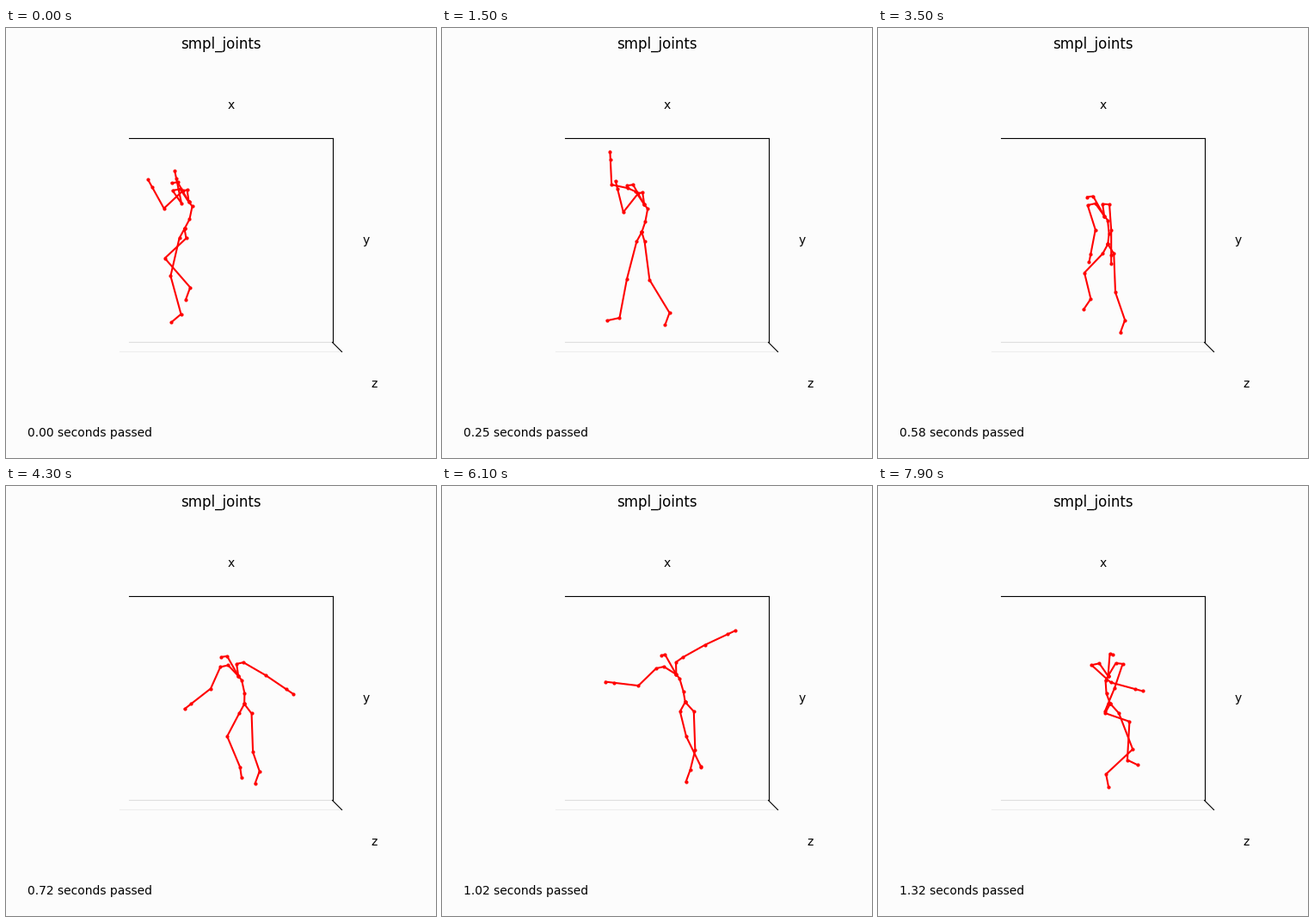
A matplotlib script for the animation above (8000 ms loop, 500 by 500 pixels).

```python
import numpy as np
import matplotlib.pyplot as plt
from matplotlib.animation import FuncAnimation

SIZE, DPI = 500, 100
FRAMES, STEP, FPS = 80, 100, 60
RED = "#ff0000"

t = np.arange(FRAMES) * STEP / 1000


def ease(start, end):
    """Smooth step from 0 to 1 between two times."""
    u = np.clip((t - start) / (end - start), 0, 1)
    return u * u * (3 - 2 * u)


def bump(center, width):
    """Passing swell that peaks at 1."""
    return np.exp(-((t - center) / width) ** 2)


def bone(parent, length, degrees):
    """End of a bone; 0 degrees points right, 90 points down."""
    return parent + length * np.exp(1j * np.radians(degrees))


def limb(root, *bones):
    """Joints of a chain whose bones are (length, degrees)."""
    joints = list(root)
    for length, degrees in bones:
        joints.append(bone(joints[-1], length, degrees))
    return np.array(joints)


# Torso: points are complex numbers, x + iy in pixels.
late = ease(6.9, 7.9)
pelvis = (195.3 + 88 * ease(-1.7, 5.4) - 13 * ease(6.8, 8)
          + 1j * (234 + 5 * ease(0, 2.2) + 15 * ease(2.2, 3.9) - 4 * bump(6.7, 0.8)))
waist = bone(pelvis, 12.5, -62 - 6.2 * t)
back = bone(waist, 15.5, -92 + 15 * np.cos(2 * np.pi * (t - 0.6) / 10))
chest = back - 4 - 5j + 7 * late
neck = chest - 13 - 23j + (15 - 3j) * late
head = neck - 7 + 1j + 10 * ease(5.2, 7.6)
spine = np.array([pelvis, waist, back, chest, neck, head])

# Legs
left_hip = pelvis + 2 + 11j + 8 * ease(0, 6)
left_leg = limb(
    [pelvis, left_hip],
    (45 - 11 * bump(0, 0.5),
     88 + 49 * bump(0, 0.55) - 8 * bump(2, 0.8) - 19 * ease(6.2, 7.9)),
    (45 - 28 * bump(5.2, 1.75), 49 + 22 * ease(0.9, 2.2) + 66 * ease(5.2, 7)),
    (15, 110 - 31 * late),
)
right_leg = limb(
    [pelvis, pelvis - 6 + 11j],
    (45 - 15 * ease(2.2, 3.7),
     103 + 31 * bump(3.4, 1.1) - 29 * ease(4, 6.5) - 56 * ease(6.8, 8)),
    (46 - 15 * bump(3.6, 0.8) - 9 * bump(6.5, 1),
     64 + 38 * bump(1.8, 1.6) + 30 * ease(7, 8)),
    (15 - 14 * bump(6, 1.3),
     140 + 28 * ease(0, 1.6) - 110 * ease(2.2, 5.2) - 33 * ease(7, 8)),
)

# Arms: the hand continues the forearm.
HAND = 9.5
left_collar = chest - 2 - 14j + (11 - 1j) * ease(5.5, 7.9)
left_shoulder = left_collar - 5 + 1j + 13 * ease(2.2, 3.5) - 9j * bump(5.5, 1.1)
swing = -134 * ease(3.5, 5.3) + 170 * ease(5.5, 8.4)
left_fore = 241 + 15 * ease(0, 0.9) - 166 * ease(2.2, 3.4) + swing
left_arm = limb(
    [chest, left_collar, left_shoulder],
    (30 - 8 * bump(2.2, 0.6), 137 - 51 * ease(0.9, 3.2) + swing),
    (29 - 5 * bump(0.9, 0.5) - 10 * ease(7, 8), left_fore),
    (HAND, left_fore),
)
right_collar = chest - 10 - 15j + (-5 + 7j) * bump(5.6, 1.3)
right_shoulder = right_collar - 9 + 2j - 6j * bump(1.5, 0.9)
right_fore = (258 + 12 * bump(1.2, 0.6) - 157 * ease(2, 3.5)
              + 90 * ease(3.5, 5.2) - 180 * ease(5.9, 8.1))
right_arm = limb(
    [chest, right_collar, right_shoulder],
    (18 + 6 * bump(0.9, 0.5) + 12 * ease(2.2, 3.5) - 9 * bump(5.1, 0.7),
     55 + 137 * ease(0, 0.9) - 134 * ease(1.5, 2.2)
     + 85 * ease(2.9, 5.2) - 105 * ease(5.7, 8.2)),
    (29, right_fore),
    (HAND, right_fore),
)
chains = [right_leg, left_leg, spine, right_arm, left_arm]

plt.rcParams["font.family"] = "DejaVu Sans"
fig = plt.figure(figsize=(SIZE / DPI, SIZE / DPI), dpi=DPI, facecolor="#fcfcfc")
ax = fig.add_axes([0, 0, 1, 1])
ax.set_xlim(0.5, SIZE + 0.5)
ax.set_ylim(SIZE + 0.5, 0.5)
ax.axis("off")

fig.suptitle("smpl_joints", fontsize=12)
ax.plot([132, 391], [377, 377], color="#ededed", lw=0.8)
ax.plot([143, 380], [366, 366], color="#dedede", lw=0.8)
for xs, ys in [((143, 380), (129, 129)), ((380, 380), (129, 366)), ((380, 391), (366, 377))]:
    ax.plot(xs, ys, color="black", lw=0.8)
for name, x, y in [("x", 262, 91), ("y", 419, 248), ("z", 429, 414.5)]:
    ax.text(x, y, name, fontsize=10, ha="center", va="center")

clock = fig.text(0.05, 0.05, "", fontsize=10)
lines = [ax.plot([], [], "o-", color=RED, lw=1.5, ms=3, mew=0)[0] for _ in chains]


def draw(i):
    for line, chain in zip(lines, chains):
        line.set_data(chain[:, i].real, chain[:, i].imag)
    clock.set_text(f"{i / FPS:.2f} seconds passed")
    return [*lines, clock]


anim = FuncAnimation(fig, draw, frames=FRAMES, interval=STEP, repeat=True, repeat_delay=0)
plt.show()
```
